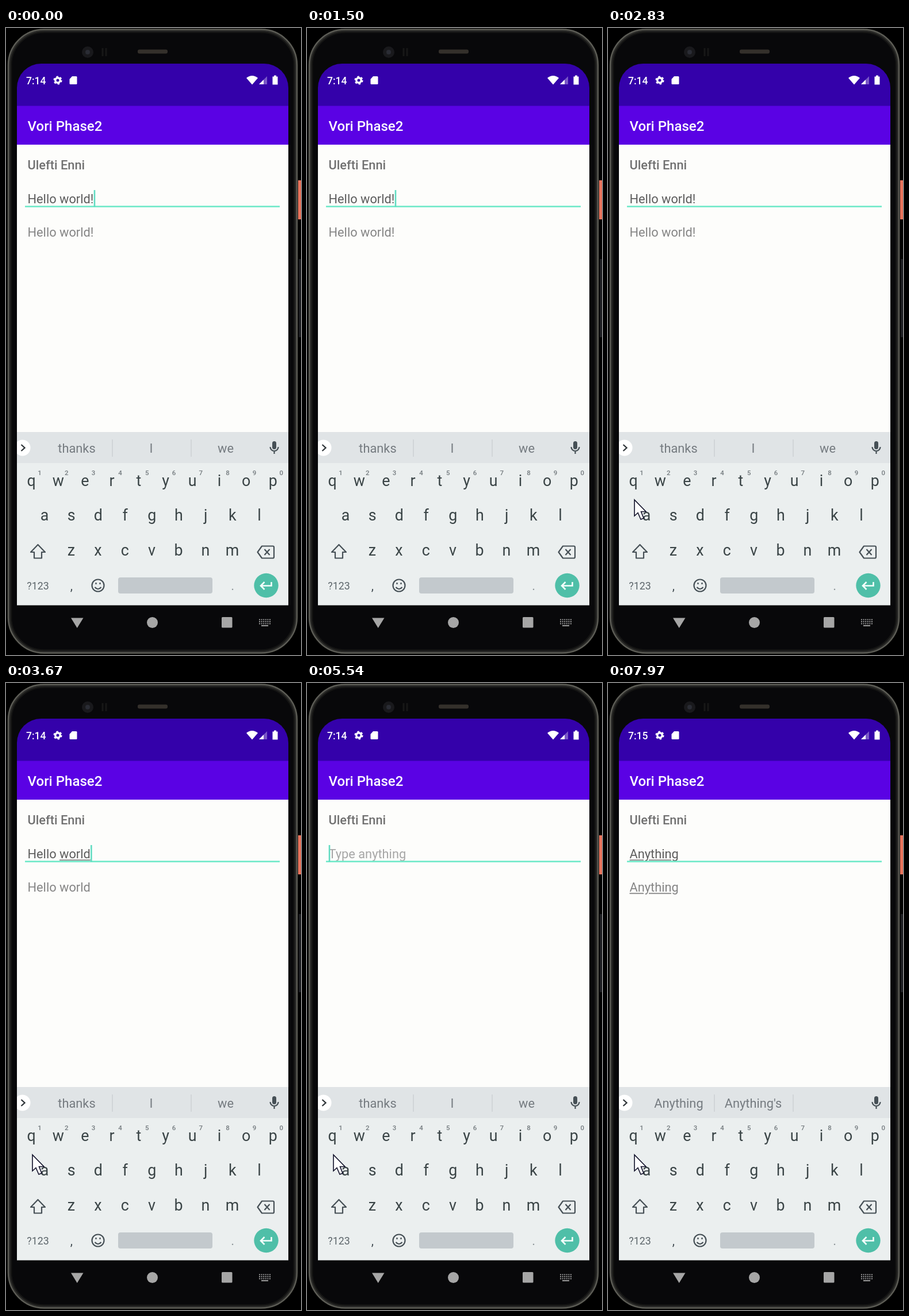
Write an HTML page that moves like this. It is 513 by 1091 pixels and loops after 8000 ms.

```html
<!DOCTYPE html>
<html lang="en">
<head>
<meta charset="utf-8">
<style>
html, body { margin: 0; width: 100%; height: 100%; overflow: hidden; background: #000; }
svg { display: block; width: 513px; height: 1091px; }
text { font-family: Roboto, sans-serif; font-size: 21.8px; white-space: pre; }
.mid { text-anchor: middle; }
.key { font-size: 26.8px; fill: #3a4446; }
.num { font-size: 11.5px; font-weight: 500; fill: #737a7e; }
.tip { fill: #757b80; }
.bold { fill: #202326; font-weight: 700; }
.line { fill: none; stroke: #465056; stroke-width: 2.2; stroke-linejoin: round; }
.field, .word { fill: currentColor; }
.mark { fill: #989898; text-decoration: underline; text-decoration-thickness: 1.5px; }
</style>
</head>
<body>
<svg viewBox="0 0 513 1091">
  <defs>
    <clipPath id="screen"><path d="M19 1004.500V104A42 42 0 0 1 61 62H449A42 42 0 0 1 491 104V1004.500Z"/></clipPath>
  </defs>

  <!-- Phone body -->
  <rect x="508" y="265" width="5" height="68" fill="#e8735c"/>
  <rect x="509" y="402" width="4" height="136" fill="#1c1d21"/>
  <rect x="4" y="2.500" width="502" height="1085" rx="62" fill="#2a2a28" stroke="#5c5c55" stroke-width="2.500"/>
  <rect x="9" y="7.500" width="492" height="1075" rx="57" fill="#08080a" stroke="#151514" stroke-width="2.500"/>
  <circle cx="142" cy="42" r="10" fill="#19191c"/>
  <circle cx="142" cy="42" r="4" fill="#2a2c34"/>
  <path d="M168 35v14m6-14v14" stroke="#171717" stroke-width="3"/>
  <rect x="229" y="37.500" width="52" height="7" rx="3" fill="#34302b"/>

  <!-- App -->
  <g clip-path="url(#screen)">
    <rect x="19" y="62" width="472" height="74" fill="#3401aa"/>
    <rect x="19" y="203" width="472" height="500" fill="#fdfdfb"/>
    <rect x="19" y="135.500" width="472" height="67.500" fill="#5a02e4"/>
    <rect x="19" y="703" width="472" height="54" fill="#e0e4e6"/>
    <rect x="19" y="757" width="472" height="248" fill="#ebefef"/>
    <circle cx="28.500" cy="730.500" r="14" fill="#fff"/>
  </g>
  <g fill="#fff">
    <text id="clock" x="35" y="98" style="font-size:17.5px;font-weight:500"></text>
    <circle cx="90" cy="91" r="4.200" fill="none" stroke="#fff" stroke-width="3.400"/>
    <circle cx="90" cy="91" r="6.400" fill="none" stroke="#fff" stroke-width="2.400" stroke-dasharray="3.350"/>
    <path d="M115 84h7q1.500 0 1.500 1.500v11q0 1.500-1.500 1.500h-10q-1.500 0-1.500-1.500V89Z"/>
    <path d="M418 87q10-8 20 0L428 98.500Z"/>
    <path d="M454 84V98H440Z" opacity=".35"/>
    <path d="M448 90V98H440Z"/>
    <path d="M463.500 84.500h2.500v-2h4v2h2.500V98.500h-9Z"/>
    <text x="37.500" y="179" style="font-size:24px;font-weight:500">Vori Phase2</text>
  </g>
  <text x="37.500" y="246" fill="#707070" font-weight="500">Ulefti Enni</text>
  <text id="input" class="field" x="37.500" y="305"></text>
  <text id="output" class="field" x="37.500" y="363" color="#858585"></text>
  <rect x="33" y="309.300" width="443" height="2.700" fill="#74eaca"/>
  <rect id="caret" y="282" width="2.600" height="29" fill="#62dcc2"/>

  <!-- Suggestions -->
  <path d="M26.500 725l6 5.500-6 5.500" fill="none" stroke="#30363a" stroke-width="2.300"/>
  <path d="M185 716v30M322 716v30" stroke="#cbd0d3" stroke-width="1.500"/>
  <g id="tips" class="mid">
    <text x="123" y="739"></text>
    <text x="252.500" y="739"></text>
    <text x="382" y="739"></text>
  </g>
  <rect x="463" y="719" width="7" height="14" rx="3.500" fill="#465056"/>
  <path class="line" d="M459.500 729a7 7 0 0 0 14 0M466.500 736v5"/>

  <!-- Keyboard -->
  <g id="keys"></g>
  <path class="line" d="M55.500 899L68 912H62V922.500H49V912H43Z"/>
  <path class="line" d="M445 901.500H464q2 0 2 2V920.500q0 2-2 2H445L437.500 912ZM449.500 907l9 10m0-10l-9 10"/>
  <text class="mid" x="55.500" y="977" fill="#5d666b" style="font-size:17.8px">?123</text>
  <text class="mid" x="114" y="978" fill="#465056">,</text>
  <g class="line">
    <circle cx="160" cy="970" r="10.500"/>
    <path d="M154.500 973q5.500 6.500 11 0"/>
    <path d="M156.500 965v3m7-3v3"/>
  </g>
  <rect x="195" y="956" width="164" height="28" rx="4" fill="#c3c9cd"/>
  <text class="mid" x="394" y="978" fill="#8b9296">.</text>
  <circle cx="452.500" cy="970" r="21.200" fill="#4fbfa8"/>
  <path d="M461.500 964v6.500H443m6.500-6.500l-6.500 6.500 6.500 6.500" fill="none" stroke="#f4fffc" stroke-width="2.600"/>

  <!-- Navigation -->
  <g fill="#a6a6a6">
    <path d="M113 1026.500H134.500L123.700 1044Z"/>
    <circle cx="254.500" cy="1034.500" r="9.500"/>
    <rect x="375" y="1025" width="18.500" height="18.500" rx="1.500"/>
  </g>
  <path d="M440 1029.500h20m-20 3.500h20m-20 3.500h20" stroke="#999" stroke-width="2" stroke-dasharray="2 1.600"/>
  <path d="M444 1040h12" stroke="#999" stroke-width="2"/>

  <path id="pointer" d="M0 0V28L6 22.500L11 34L16 32L11.500 20.500H20Z" fill="#fff" stroke="#101028" stroke-width="1.600"/>
</svg>
<script>
const $ = id => document.getElementById(id);
const LOOP = 8000, OLD = "Hello world!", NEW = "Anything";
const ERASE = { start: 3600, step: 135 }, TYPE = { start: 5800, step: 210 };
const BLINK = 520;
const path = [[1700, 513, 130], [2030, 191, 277], [2650, 46, 821]];

const rows = [["qwertyuiop", 44, 797], ["asdfghjkl", 67, 857], ["zxcvbnm", 113.3, 918]];
$("keys").innerHTML = rows.map(([letters, x0, y], row) => [...letters].map((c, i) => {
  const x = x0 + 46.7 * i;
  const digit = row ? "" : `<text class="num mid" x="${x + 14.5}" y="778">${(i + 1) % 10}</text>`;
  return `<text class="key mid" x="${x}" y="${y}">${c}</text>${digit}`;
}).join("")).join("");

// Number of key presses so far, and the time of the latest one
function presses(t, { start, step }, max) {
  const n = Math.max(0, Math.min(max, Math.floor((t - start) / step) + 1));
  return [n, start + (n - 1) * step];
}

function setText(el, text, underlined) {
  const cut = underlined ? text.lastIndexOf(" ") + 1 : text.length;
  el.innerHTML = text.slice(0, cut) +
    `<tspan class="mark"><tspan class="word">${text.slice(cut)}</tspan></tspan>`;
}

function suggestions(word) {
  if (word === NEW) return [NEW, NEW + "'s", ""];
  if (word.length > 2) return [word, NEW, NEW + "'s"];
  return ["thanks", "I", "we"];
}

function movePointer(t) {
  const visible = t >= path[0][0];
  $("pointer").style.display = visible ? "" : "none";
  if (!visible) return;
  let [, x, y] = path[path.length - 1];
  const i = path.findIndex(p => p[0] > t);
  if (i > 0) {
    const [t0, x0, y0] = path[i - 1], [t1, x1, y1] = path[i];
    const k = (t - t0) / (t1 - t0), ease = k * k * (3 - 2 * k);
    x = x0 + (x1 - x0) * ease;
    y = y0 + (y1 - y0) * ease;
  }
  $("pointer").setAttribute("transform", `translate(${x} ${y})`);
}

function draw(t) {
  const [erased, eraseTime] = presses(t, ERASE, OLD.length);
  const [typed, typeTime] = presses(t, TYPE, NEW.length);
  const text = typed ? NEW.slice(0, typed) : OLD.slice(0, OLD.length - erased);
  const lastEdit = typed ? typeTime : erased ? eraseTime : 0;

  setText($("input"), text, erased > 0);
  const width = text ? $("input").getComputedTextLength() : 0;
  if (!text) setText($("input"), "Type anything", false);
  $("input").setAttribute("color", text ? "#5c5c5c" : "#a6a6a6");
  setText($("output"), text, typed > 0);

  $("caret").setAttribute("x", 37.7 + width);
  $("caret").style.display = (t - lastEdit) % (2 * BLINK) < BLINK ? "" : "none";

  const words = suggestions(typed ? text : "");
  [...$("tips").children].forEach((el, i) => {
    el.textContent = words[i];
    el.setAttribute("class", i === 1 && words[1] === NEW ? "bold" : "tip");
  });
  $("clock").textContent = t < 7500 ? "7:14" : "7:15";
  movePointer(t);
}

const begin = performance.now();
function tick() {
  draw((performance.now() - begin) % LOOP);
  requestAnimationFrame(tick);
}
tick();
</script>
</body>
</html>
```
